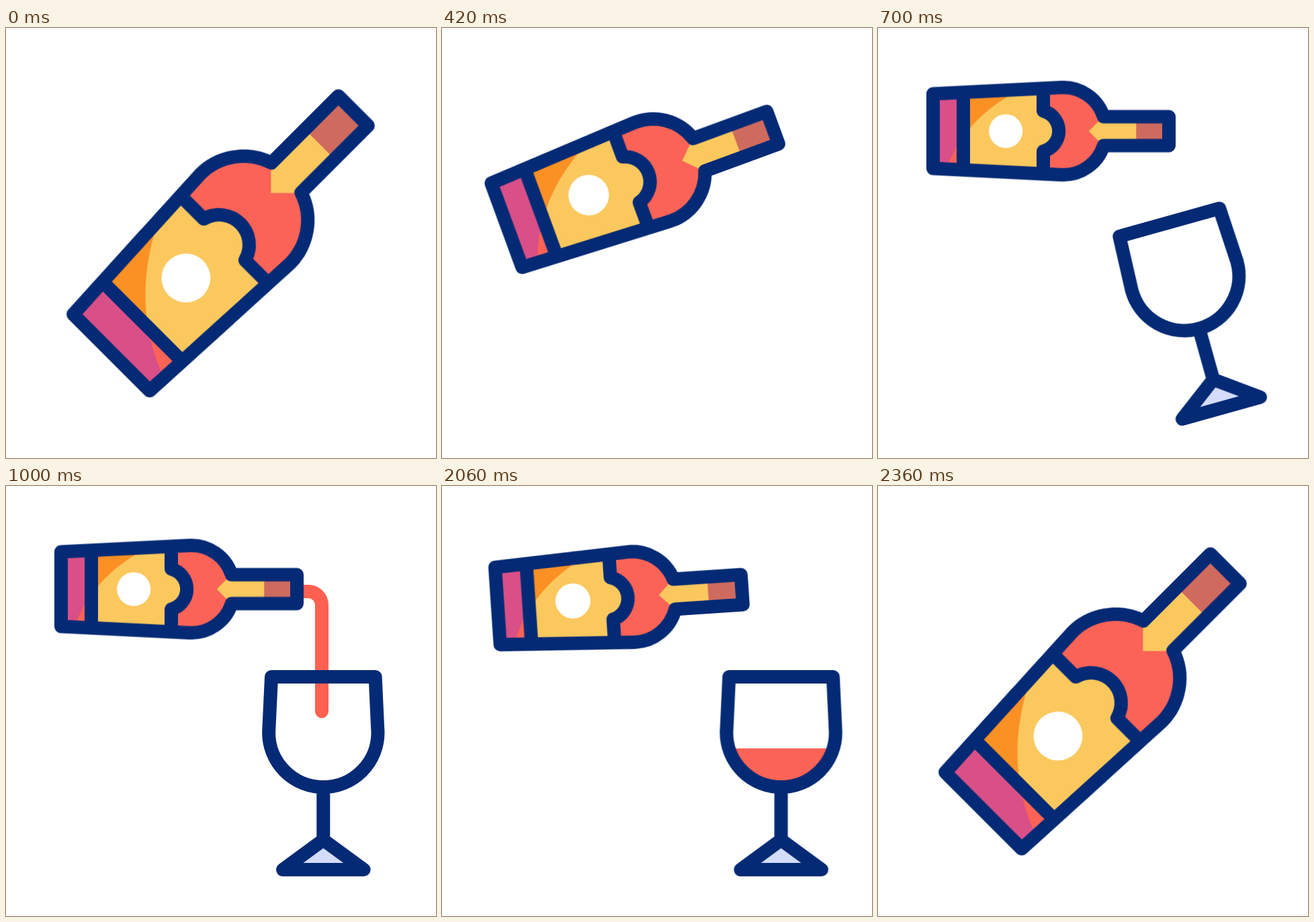
An HTML page for the animation above (2400 ms loop, 640 px wide and 640 px high).

```html
<!DOCTYPE html>
<html lang="en">
<head>
<meta charset="utf-8">
<title>Pouring wine</title>
<style>
  html, body { margin: 0; width: 100%; height: 100%; overflow: hidden; background: #fff; }
  svg { display: block; width: 100vw; height: 100vh; }

  .line {
    fill: none; stroke: #042a75; stroke-width: 20;
    stroke-linecap: round; stroke-linejoin: round;
  }
  /* Not inherited, so it must sit on the paths themselves. */
  path.line, #body { vector-effect: non-scaling-stroke; }
  .butt { stroke-linecap: butt; }
  .red { fill: #fb6357; }
  .yellow { fill: #fbc85e; }

  .bottle, .glass, .stream, .wine {
    animation: 2400ms cubic-bezier(.333, 0, .667, 1) infinite;
  }
  .bottle { animation-name: tilt; }
  .glass { animation-name: slide; }
  .wine { animation-name: fill; }
  .stream {
    animation-name: pour;
    fill: none; stroke: #fe6150; stroke-width: 20; stroke-linecap: round;
    stroke-dasharray: 100 300;
  }

  @keyframes tilt {
    0%, 4.1667% { transform: translate(326.1px, 313.9px) rotate(-45deg) scale(1.45); }
    29.1667%, 83.3333% { transform: translate(247px, 153.5px) rotate(0deg) scale(1); }
    97.5%, 100% { transform: translate(326.1px, 313.9px) rotate(-45deg) scale(1.45); }
  }
  @keyframes slide {
    0%, 16.6667% { transform: translate(852.3px, 427.4px) rotate(-15.6deg); }
    29.1667% { transform: translate(472.3px, 427.4px) rotate(-15.6deg); }
    37.5%, 83.3333% { transform: translate(472.3px, 427.4px) rotate(0deg); }
    97.5%, 100% { transform: translate(852.3px, 427.4px) rotate(0deg); }
  }
  @keyframes pour {
    0%, 28.75% { stroke-dashoffset: 102; }
    49.1667%, 52.0833% { stroke-dashoffset: 0; }
    79.3%, 100% { stroke-dashoffset: -102; }
  }
  @keyframes fill {
    0%, 64.1667% { transform: translateY(50px); }
    81.6667%, 100% { transform: translateY(0); }
  }
</style>
</head>
<body>
<svg viewBox="0 0 640 640">
  <defs>
    <path id="body" d="M82 98L273 88.6A62.7 62.7 0 0 1 335.8 132H433V175H335.8A62.7 62.7 0 0 1 273 218.4L82 209Z"/>
    <path id="bowl" d="M395 284H549.6L553.5 367A81.2 81.2 0 0 1 391.1 367Z"/>
    <clipPath id="inBody"><use href="#body"/></clipPath>
    <clipPath id="inBowl"><use href="#bowl"/></clipPath>
  </defs>

  <path class="stream" pathLength="100" d="M433 157H450A20 20 0 0 1 470 177V428"/>

  <g class="glass">
    <g transform="translate(-472.3 -427.4)">
      <g clip-path="url(#inBowl)">
        <rect class="wine red" x="380" y="390.5" width="185" height="70"/>
      </g>
      <path fill="#d3dcf9" d="M412 571H532.6L472.3 526.8Z"/>
      <use href="#bowl" class="line"/>
      <path class="line" d="M472.3 448V526.8L412 571H532.6L472.3 526.8"/>
    </g>
  </g>

  <g class="bottle">
    <g transform="translate(-247 -153.5)">
      <g clip-path="url(#inBody)">
        <use href="#body" class="red"/>
        <path class="yellow" d="M127 80H246V123.5A31 31 0 0 1 246 183.5V225H127Z"/>
        <path fill="#fb9024" d="M127 80H230L195.6 100.4Q152 126 127 162Z"/>
        <path fill="#d94f87" d="M70 80H127V162Q113 181 105 202L98 220H70Z"/>
        <path class="yellow" d="M313.6 153.5L340.1 127H384.5V180H340.1Z"/>
        <rect x="384.5" y="125" width="50" height="55" fill="#cf6a5f"/>
        <circle cx="190.2" cy="153.5" r="25.1" fill="#fff"/>
      </g>
      <path class="line butt" d="M127 95.8V211.2"/>
      <path class="line butt" d="M246 90V123.5A31 31 0 0 1 246 183.5V217"/>
      <use href="#body" class="line"/>
    </g>
  </g>
</svg>
</body>
</html>
```
